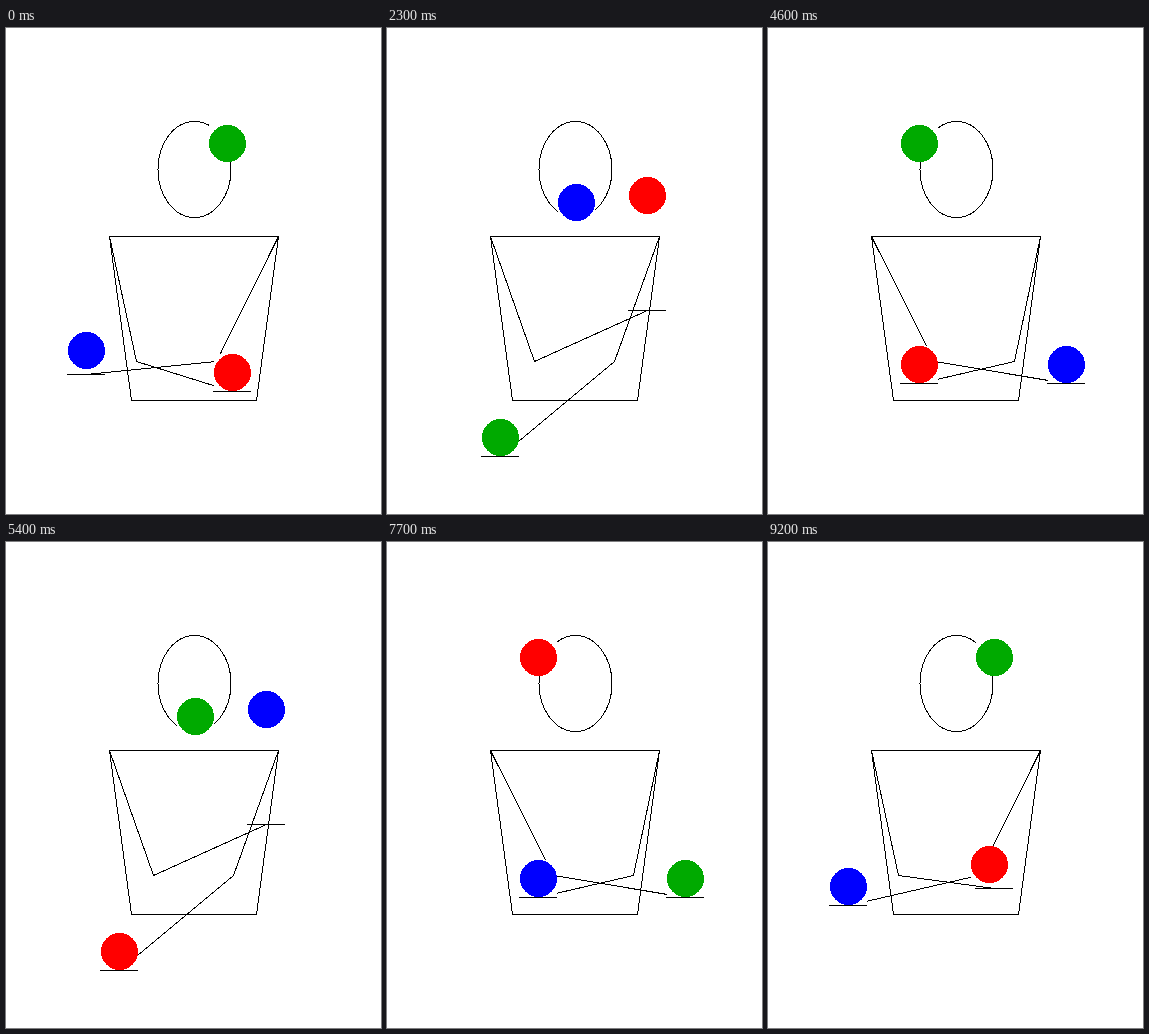
An HTML page for the animation above (9300 ms loop, 375 px wide and 486 px high).

```html
<!DOCTYPE html>
<html lang="en">
<head>
<meta charset="utf-8">
<title>Juggler</title>
<style>
  html, body { margin: 0; width: 100%; height: 100%; overflow: hidden; background: #fff; }
  svg { display: block; width: 375px; height: 486px; }
  .ink { fill: none; stroke: #000; stroke-width: 1; }
</style>
</head>
<body>
<svg viewBox="0 0 375 486" shape-rendering="crispEdges">
  <g id="stage" transform="translate(.5 .5)">
    <ellipse class="ink" cx="188" cy="141" rx="36.5" ry="48"/>
    <path class="ink" d="M103 208H272L250 372H125Z"/>
  </g>
</svg>
<script>
const STEP = 100, BEAT = 15.5, HALF = 31, CYCLE = 93;
const REST = 355, DIP = 73.3, THROW = 221;
const stage = document.getElementById('stage');

function add(tag, attrs, parent = stage) {
  const el = document.createElementNS('http://www.w3.org/2000/svg', tag);
  for (const key in attrs) el.setAttribute(key, attrs[key]);
  return parent.appendChild(el);
}

// Column 0 is the left hand's outer point, 46 the right hand's.
const column = k => Math.floor(k < 24 ? 80.52 + 4.74 * k : 298.3 - 4.77 * (46 - k));
const arc = s => 4 * s * (1 - s);

// Each hand dips while carrying and rises while empty.
function handY(p, right) {
  const early = p < 15;
  const s = early ? (p + 0.5) / BEAT : (p - 15) / BEAT;
  const sign = early === right ? 1 : -1;
  return REST + Math.trunc(sign * DIP * arc(s) - 0.2);
}

function handAt(p, right) {
  const k = p <= 15 ? p : 30 - p;
  return [column(right ? 31 + k : k), handY(p, right)];
}

function ballAt(n) {
  const x = column(n <= 46 ? n : 92 - n);
  let start = null;
  if (n < 31) start = -0.5;
  else if (n >= 46 && n < 77) start = 46;
  const y = start === null
    ? handY(n % HALF, n < 46) - 19
    : REST - 19 - Math.round(THROW * arc((n - start) / HALF));
  return [x, y];
}

// The arms cross: each shoulder reaches for the opposite hand.
const arms = [
  { right: true, shoulder: 103, elbow: 17 },
  { right: false, shoulder: 272, elbow: 170 }
].map(arm => ({ ...arm, path: add('path', { class: 'ink' }) }));

const balls = [['#00f', 0], ['#f00', 31], ['#0a0', 62]].map(([fill, offset]) => {
  const node = add('g', {});
  add('rect', { x: -18.5, y: -18.5, width: 37, height: 37, fill: '#fff' }, node);
  add('circle', { r: 18.5, fill }, node);
  return { node, offset };
});

function draw(n) {
  for (const { right, shoulder, elbow, path } of arms) {
    const [x, y] = handAt(n % HALF, right);
    const bend = Math.round(elbow + x / 2);
    path.setAttribute('d',
      `M${shoulder} 208L${bend} 333L${x} ${y}M${x - 19.5} ${y}H${x + 18.5}`);
  }
  for (const { node, offset } of balls) {
    node.setAttribute('transform', `translate(${ballAt((n + offset) % CYCLE)})`);
  }
}

const begin = performance.now();
function tick() {
  draw(Math.floor((performance.now() - begin) / STEP) % CYCLE);
  requestAnimationFrame(tick);
}
tick();
</script>
</body>
</html>
```
